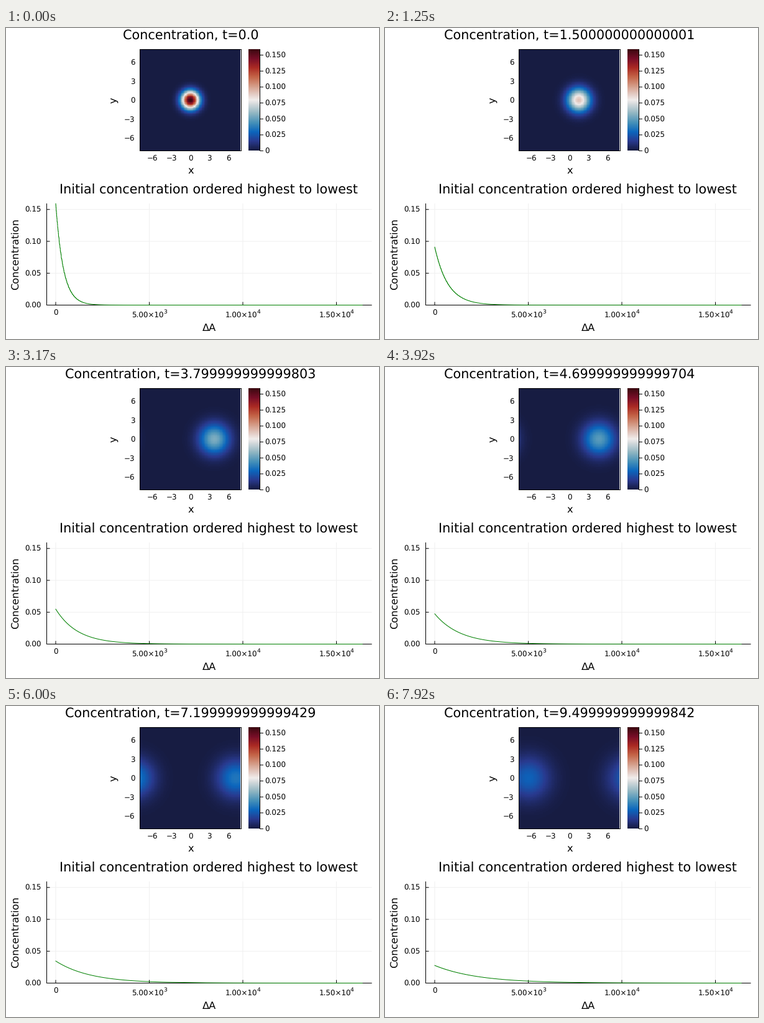
A matplotlib script that plays this animation: 600x500 px, repeating every 8000 ms.

```python
import numpy as np
import matplotlib.pyplot as plt
from matplotlib.animation import FuncAnimation
from matplotlib.colors import LinearSegmentedColormap

W, H, DPI = 600, 500, 100
FRAMES, LOOP_MS = 96, 8000
DT, STEPS = 0.002, 50            # solver step, steps per frame
N, HALF, SPEED, DIFF = 128, 8.0, 1.0, 0.25
PEAK = 1 / (2 * np.pi)

PX = 72 / DPI                    # points per pixel
TITLE, LABEL, TICK, SUPER = 20.8, 16.3, 11.9, 9.2

plt.rcParams.update({"font.family": "DejaVu Sans", "text.hinting": "none"})

# Diverging blue-white-red map
STOPS = [(23, 28, 66), (41, 58, 143), (11, 102, 189), (69, 144, 185),
         (142, 181, 194), (210, 216, 219), (241, 236, 235), (230, 210, 204),
         (213, 157, 137), (196, 101, 72), (172, 43, 36), (120, 14, 40),
         (60, 9, 17)]
POS = sorted([i / 11 for i in range(12)] + [0.5])
CMAP = LinearSegmentedColormap.from_list(
    "balance", [(p, tuple(v / 255 for v in c)) for p, c in zip(POS, STOPS)], N=256)

fig = plt.figure(figsize=(W / DPI, H / DPI), dpi=DPI, facecolor="white")
ax = fig.add_axes([0, 0, 1, 1])
ax.set_axis_off()


def text(x, y, s, size, ha="center", rot=0):
    """Text with its baseline on (x, y), turned about that point."""
    return ax.text(x, y, s, fontsize=size * PX, ha=ha, va="baseline",
                   rotation=rot, rotation_mode="anchor", color="black")


def line(xs, ys, color="black", z=3):
    return ax.plot(xs, ys, color=color, lw=PX, zorder=z, snap=False,
                   solid_capstyle="projecting")[0]


# Heat map
CX, CY, UNIT = 297.0, 116.4, 10.19
L, R, T, B = 215.5, 378.5, 34.5, 197.5
heat = ax.imshow(np.zeros((N, N)), cmap=CMAP, vmin=0, vmax=PEAK,
                 extent=(215, 377, 198, 35), interpolation="nearest",
                 aspect="auto", zorder=1)
line([L, R, R, L, L], [T, T, B, B, T])
for v in range(-6, 7, 3):
    label = str(v).replace("-", "\u2212")
    text(CX + v * UNIT - 0.3, 213.8, label, TICK)
    text(207.3, CY - v * UNIT + 4.5, label, TICK, "right")
text(CX, 234, "x", LABEL)
text(178, CY, "y", LABEL, rot=90)

# Colour bar
ax.imshow(np.linspace(1, 0, 256)[:, None], cmap=CMAP, vmin=0, vmax=1,
          extent=(390, 408, 197.5, 34.6), aspect="auto", zorder=1)
line([408.5, 408.5], [34.5, 197.5])
for i in range(7):
    y = 197.5 - i * 25.65
    line([408.5, 413.5], [y, y])
    text(416.5, y + 4.2, f"{i * 0.025:.3f}" if i else "0", TICK, "left")

# Ordered concentration
X0, Y0, X1, YT = 65.5, 445.5, 588.0, 282.6
ZERO, PER_CELL, PER_C = 80.0, 0.0301, 1025.0
for i in range(4):
    x, y = ZERO + i * 5000 * PER_CELL, Y0 - i * 0.05 * PER_C
    line([x, x], [YT, Y0], "#f0f0f0", 0)
    line([X0, X1], [y, y], "#f0f0f0", 0)
    line([x, x], [Y0, Y0 - 4.5])
    line([X0, X0 + 4.5], [y, y])
    text(56.7, y + 4.4, f"{i * 0.05:.2f}", TICK, "right")
    if i:
        power = 3 if i == 1 else 4
        text(x - 28, 465.7, f"{i * 5000 / 10 ** power:.2f}\u00d710", TICK, "left")
        text(x + 22.3, 459, str(power), SUPER, "left")
    else:
        text(x, 461.5, "0", TICK)
line([X0, X0], [YT, Y0])
line([X0, X1], [Y0, Y0])
text(326.8, 487, "\u0394A", LABEL)
text(20, 364, "Concentration", LABEL, rot=90)
text(325.6, 267, "Initial concentration ordered highest to lowest", TITLE)

curve = line([], [], "green", 4)
title = text(CX, 18.3, "", TITLE)

ax.set_xlim(0, W)
ax.set_ylim(H, 0)

grid = -HALF + 2 * HALF / N * np.arange(N)
cells = ZERO + PER_CELL * np.arange(1, N * N + 1)


def elapsed(steps):
    """Time by repeated addition, which keeps its rounding drift."""
    t = 0.0
    for _ in range(steps):
        t += DT
    return t


def bell(offset, var):
    """Periodic Gaussian along one direction."""
    return sum(np.exp(-(offset + 2 * HALF * k) ** 2 / (2 * var))
               for k in range(-2, 3))


def draw(frame):
    t = elapsed(frame * STEPS)
    var = 1 + 2 * DIFF * t
    conc = PEAK / var * np.outer(bell(grid, var), bell(grid - SPEED * t, var))
    heat.set_data(conc[::-1])
    curve.set_data(cells, Y0 - PER_C * np.sort(conc, axis=None)[::-1])
    title.set_text(f"Concentration, t={t!r}")
    return heat, curve, title


anim = FuncAnimation(fig, draw, frames=FRAMES, interval=LOOP_MS / FRAMES,
                     repeat=True, repeat_delay=0, blit=False)
plt.show()
```
